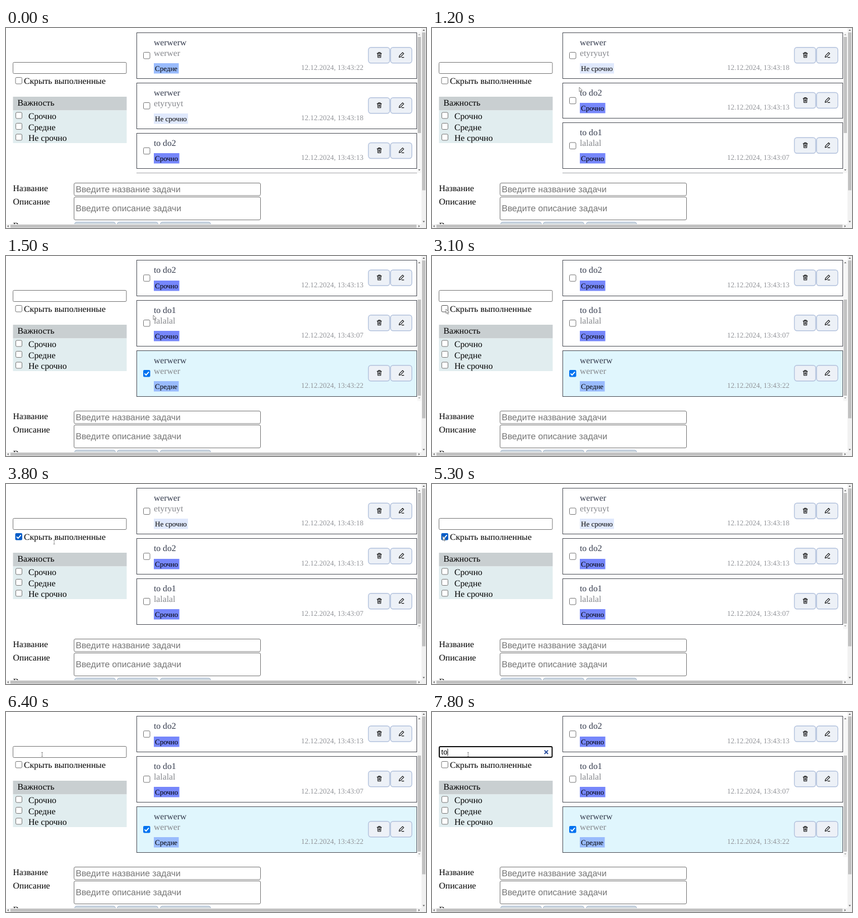
Write an HTML page that moves like this. It is 750 by 358 pixels and loops after 8000 ms.

```html
<!DOCTYPE html>
<html lang="ru">
<head>
<meta charset="utf-8">
<title>Список задач</title>
<style>
html, body { margin: 0; width: 100%; height: 100%; overflow: hidden; background: #fff; }
svg { display: block; width: 750px; height: 358px; text-rendering: geometricPrecision; }
text { font: 15.7px "Liberation Serif", "Times New Roman", serif; white-space: pre; }
.small { font-size: 13px; }
.sans { font-family: "Liberation Sans", Arial, sans-serif; }
</style>
</head>
<body>
<svg id="stage" viewBox="0 0 750 358" xmlns="http://www.w3.org/2000/svg"></svg>
<script>
const LOOP = 8000, STEP = 100;
const CHECK_AT = 800, SCROLL_AT = 1400, HIDE_AT = 3600, SHOW_AT = 5800, FOCUS_AT = 6700;
const stage = document.getElementById('stage');

const LEVELS = {
  low: ['Не срочно', '#dfe8fc', 61],
  mid: ['Средне', '#99bbfd', 44.5],
  high: ['Срочно', '#7687fb', 45.5]
};
const TASKS = [
  { id: 'a', title: 'werwerw', note: 'werwer', level: 'mid', time: '13:43:22' },
  { id: 'b', title: 'werwer', note: 'etyryuyt', level: 'low', time: '13:43:18' },
  { id: 'c', title: 'to do2', note: '', level: 'high', time: '13:43:13' },
  { id: 'd', title: 'to do1', note: 'lalalal', level: 'high', time: '13:43:07' }
];
const heightOf = task => task.note ? 82 : 63.5;

// Pointer stops: time, x, y
const PATH = [
  [100, 20, 184], [300, 90, 120], [500, 225, 50], [600, 250, 46], [800, 250, 46],
  [1000, 263, 106], [1500, 263, 106], [1700, 268, 118], [2000, 300, 200], [2400, 190, 130],
  [2700, 60, 100], [3000, 30, 97], [3200, 20, 93], [3600, 20, 93], [3800, 86, 104],
  [4300, 86, 104], [4700, 130, 120], [5000, 50, 100], [5200, 19, 93], [5900, 19, 93],
  [6300, 64.5, 76], [LOOP, 64.5, 76]
];

function pointerAt(t) {
  if (t < PATH[0][0]) return null;
  const i = Math.max(1, PATH.findIndex(p => p[0] >= t));
  const [t0, x0, y0] = PATH[i - 1], [t1, x1, y1] = PATH[i];
  const k = (t - t0) / (t1 - t0), ease = k * k * (3 - 2 * k);
  return { x: x0 + (x1 - x0) * ease, y: y0 + (y1 - y0) * ease };
}

const rect = (x, y, w, h, fill, more = '') =>
  `<rect x="${x}" y="${y}" width="${w}" height="${h}" fill="${fill}" ${more}/>`;
const text = (x, y, s, fill = '#000', cls = '') =>
  `<text x="${x}" y="${y}" fill="${fill}" class="${cls}">${s}</text>`;
const path = (d, more) => `<path d="${d}" ${more}/>`;
const inside = (p, x, y, w, h) => p && p.x >= x && p.x <= x + w && p.y >= y && p.y <= y + h;

function checkbox(x, y, size, on, hover) {
  if (!on) {
    return rect(x + .5, y + .5, size - 1, size - 1, '#fff',
      `rx="2" stroke="${hover ? '#4f4f4f' : '#767676'}"`);
  }
  const s = size / 12;
  return rect(x, y, size, size, hover ? '#005cc8' : '#0072f0', 'rx="2"') +
    path(`M${x + 2.4 * s} ${y + 6.2 * s}l${2.5 * s} ${2.5 * s}l${4.8 * s} ${-5.5 * s}`,
      'fill="none" stroke="#fff" stroke-width="1.8"');
}

function button(x, y) {
  return rect(x + .7, y + .7, 38, 28, '#edf1f7', 'rx="4.5" stroke="#b3c2dd" stroke-width="1.4"');
}

function icons(y) {
  const line = 'fill="none" stroke="#111" stroke-width="1.1" stroke-linejoin="round" stroke-linecap="round"';
  return path(`M662.8 ${y - 2.8}h7.6M665 ${y - 3}v-1.5h3.2v1.5M663.6 ${y - 2.6}l.5 7.2h5l.5 -7.2M665.8 ${y - .8}v3.4M667.4 ${y - .8}v3.4`, line) +
    path(`M702 ${y + 4.2}l.6 -2.8l5.6 -5.8l2.1 2l-5.6 5.8zM706.8 ${y + 4.4}h3.6`, line);
}

function card(task, y, done, p) {
  const h = heightOf(task), mid = y + h / 2;
  const top = Math.floor(y), bottom = Math.floor(y + h);
  const [label, color, width] = LEVELS[task.level];
  return rect(233.5, top + .5, 500, bottom - top, done ? '#e0f6fd' : '#fff', 'stroke="#4a4d55"') +
    checkbox(245, mid - 6, 12.5, done, inside(p, 245, mid - 7, 13, 13)) +
    text(264, y + 22.8, task.title, '#343b4d') +
    text(264, y + 41.5, task.note, '#85878c') +
    rect(264, bottom - 27, width, 18.5, color) +
    text(266, y + h - 13.2, label, '#000', 'small') +
    text(527, y + h - 15.2, '12.12.2024, ' + task.time, '#929499', 'small') +
    button(646.5, mid - 15) + button(686, mid - 15) + icons(mid - .8);
}

function taskList(t, p) {
  const done = t >= CHECK_AT, hidden = t >= HIDE_AT && t < SHOW_AT;
  let list = TASKS;
  if (done) list = TASKS.slice(1).concat(hidden ? [] : TASKS[0]);
  const scroll = hidden ? .5 : t >= SCROLL_AT ? 90.5 : 0;
  let y = 8 - scroll, out = '';
  for (const task of list) {
    out += card(task, y, done && task.id === 'a', p);
    y += heightOf(task) + 8;
  }
  const [top, size] = hidden ? [16, 234] : scroll ? [78, 172] : [16, 172];
  const arrow = active => `fill="${active ? '#707070' : '#aaa'}"`;
  return `<g clip-path="url(#view)">${out}</g>` +
    rect(734.5, 7.5, 7, 252, '#f6f6f6') +
    rect(735.2, top, 5.8, size, '#c1c1c1') +
    path('M736 13l2 -2.4l2 2.4z', arrow(scroll)) +
    path('M736 253l2 2.4l2 -2.4z', arrow(!scroll));
}

function sidebar(t, p) {
  const focus = t >= FOCUS_AT, typed = t >= 7700 ? 'to' : t >= 7500 ? 't' : '';
  const hidden = t >= HIDE_AT && t < SHOW_AT;
  let out = focus
    ? rect(13, 62, 201.5, 19, '#fff', 'rx="2" stroke="#101010" stroke-width="2"')
    : rect(12.5, 61.5, 202.5, 20, '#fff', 'rx="2" stroke="#767676"');
  out += text(16.6, 76.2, typed, '#000', 'small sans');
  if (focus && (t < 7200 || typed)) {
    const x = 17 + [0, 3.6, 10.8][typed.length];
    out += rect(x - .2, 65.5, .9, 13, '#000');
  }
  if (typed) out += path('M200.8 68.6l6.4 6.4m0 -6.4l-6.4 6.4', 'stroke="#2b4f9e" stroke-width="2"');
  out += checkbox(16.5, 88, 12.5, hidden, inside(p, 16, 87, 162, 17.5)) +
    text(32, 99.6, 'Скрыть выполненные') +
    rect(12.5, 123, 203, 24.5, '#c9cfd1') + rect(12.5, 147.5, 203, 58.5, '#e1edef') +
    text(20.5, 139.2, 'Важность');
  ['Срочно', 'Средне', 'Не срочно'].forEach((s, i) => {
    const y = 150.5 + i * 19.5;
    out += checkbox(17, y, 12, false, inside(p, 17, y, 12, 12)) + text(40, y + 12.8, s);
  });
  return out;
}

function form() {
  const box = 'rx="2.5" stroke="#767676"';
  let out = text(12.5, 291.6, 'Название') + text(12.5, 316.3, 'Описание') + text(12.5, 359, 'Важность') +
    rect(121.5, 277.5, 333, 22.5, '#fff', box) + rect(121.5, 302.5, 333, 41, '#fff', box) +
    text(124.5, 294.2, 'Введите название задачи', '#757575', 'sans') +
    text(124.5, 328.4, 'Введите описание задачи', '#757575', 'sans');
  for (const [x, w] of [[122.5, 73], [198.5, 73], [275.5, 90]]) {
    out += rect(x, 347.5, w, 20, '#cfd8de', 'rx="4" stroke="#b3c2d6" stroke-width="1.3"');
  }
  return out;
}

function pageBars() {
  const dark = 'fill="#606060"';
  return rect(742, 0, 8, 358, '#f1f1f1') + rect(0, 351, 750, 7, '#f1f1f1') +
    rect(743, 8, 6, 282.5, '#c1c1c1') + rect(8, 352, 725, 5.5, '#c1c1c1') +
    path('M744 5l2 -2.4l2 2.4zM744 345.5l2 2.4l2 -2.4z', dark) +
    path('M4.6 352.8l-2.4 2l2.4 2zM736.6 352.8l2.4 2l-2.4 2z', dark);
}

function pointer(p) {
  if (!p) return '';
  const { x, y } = p;
  const onLabel = inside(p, 32, 87, 146, 18), onField = inside(p, 13, 62, 202, 20);
  if (onLabel || onField) {
    return path(`M${x - 1.5} ${y - 3.6}h3M${x} ${y - 3.6}v7.2M${x - 1.5} ${y + 3.6}h3`,
      'fill="none" stroke="#8a8a8a" stroke-width=".9"');
  }
  return path(`M${x} ${y}v8l1.9 -1.7l1.3 2.9l1.2 -.6l-1.3 -2.8h2.4z`,
    'fill="#fff" stroke="#555" stroke-width=".7"');
}

const DEFS = '<defs><clipPath id="view"><rect x="232" y="7" width="503" height="252.5"/></clipPath></defs>';
const FORM = form() + pageBars();

function draw(t) {
  const p = pointerAt(t);
  stage.innerHTML = DEFS + sidebar(t, p) + taskList(t, p) + FORM + pointer(p);
}

let last = -1;
function tick(now) {
  const t = Math.floor((now - start) % LOOP / STEP) * STEP;
  if (t !== last && t >= 0) draw(last = t);
  requestAnimationFrame(tick);
}
const start = performance.now();
draw(0);
requestAnimationFrame(tick);
</script>
</body>
</html>
```
